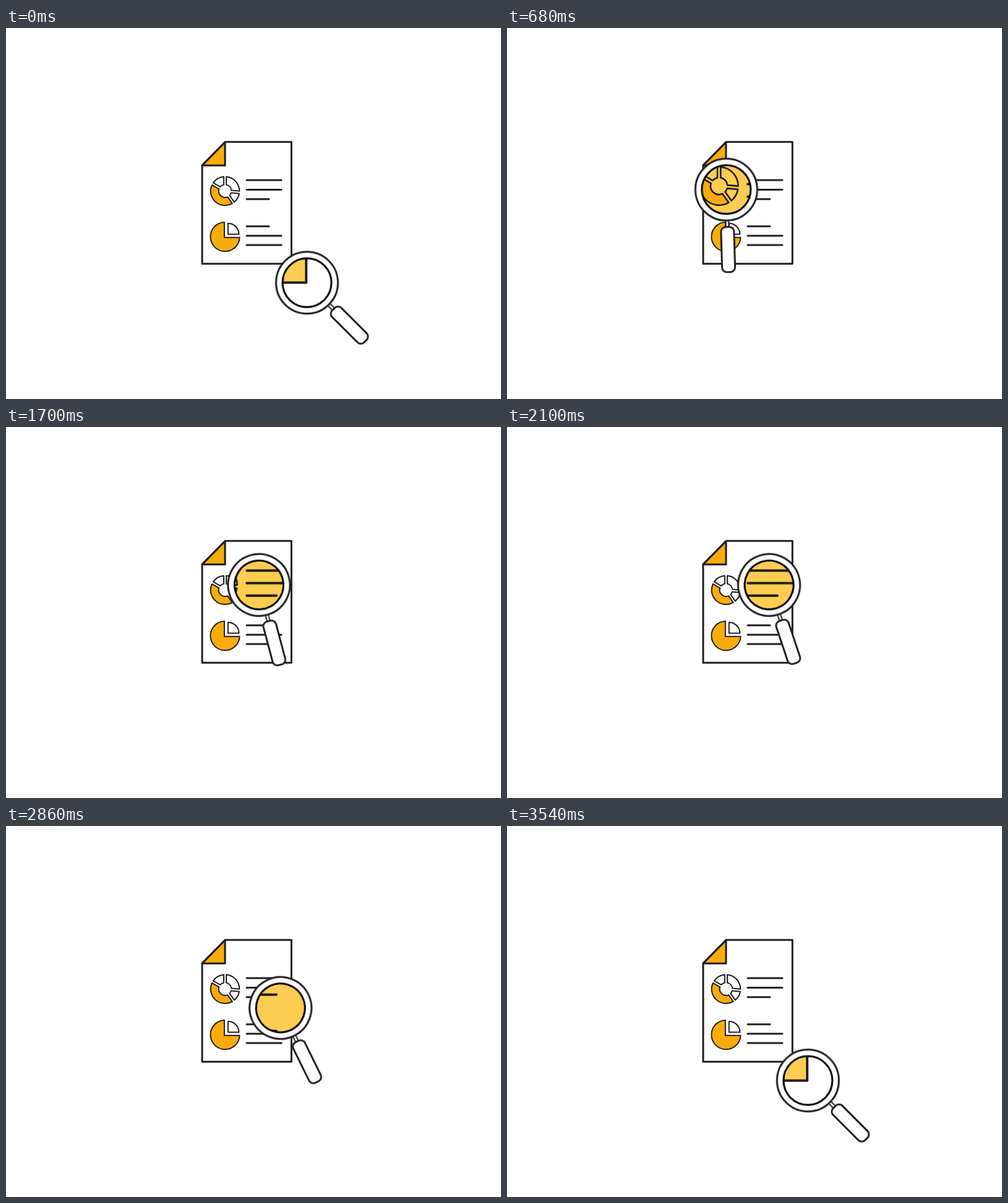
An HTML page for the animation above (3730 ms loop, 800 by 600 pixels).

```html
<!DOCTYPE html>
<html lang="en">
<head>
<meta charset="utf-8">
<title>Report review</title>
<style>
  html, body { margin: 0; width: 100%; height: 100%; overflow: hidden; background: #fff; }
  svg { position: absolute; left: 0; top: 0; width: 800px; height: 600px; }
  svg * { stroke-linejoin: round; stroke-linecap: round; }

  .page  { --paper: #fff; --accent: #f8ac0c; }
  .zoom  { --paper: #fccd50; --accent: #f7a90f; }
  .paper { fill: var(--paper); }
  .accent { fill: var(--accent); }
  .ink  { stroke: #231f20; stroke-width: 3; }
  .thin { stroke: #231f20; stroke-width: 2; }

  /* Travel in, sweep right, travel back, short rest */
  .tool, .zoom { animation: 3730ms ease infinite; }
  .tool { animation-name: move; }
  .zoom { animation-name: clip; }
  @keyframes move {
    0%, 96.515%, 100% { transform: translate(486.5px, 412px) rotate(-45deg); }
    24.129% { transform: translate(349.3px, 255.5px) rotate(0deg); }
    72.386% { transform: translate(429.6px, 255.5px) rotate(-20deg); }
  }
  @keyframes clip {
    0%, 96.515%, 100% { clip-path: circle(39.5px at 486.5px 412px); }
    24.129% { clip-path: circle(39.5px at 349.3px 255.5px); }
    72.386% { clip-path: circle(39.5px at 429.6px 255.5px); }
  }
</style>
</head>
<body>
<svg class="page" viewBox="0 0 800 600">
  <defs>
    <g id="doc">
      <path class="paper ink" d="M354 184.2H461.3V381.3H317V222Z"/>
      <path class="accent ink" d="M354 184.7V222.2H317Z"/>
      <g id="donut"></g>
      <path class="accent thin" d="M352.9 314.1V338.7H377.6A23.6 23.6 0 1 1 352.9 314.1Z"/>
      <path class="paper thin" d="M358.8 316V333.4H376.4A17.5 17.5 0 0 0 358.8 316Z"/>
      <path class="ink" d="M389 246.1h56M389 261.4h56M389 276.7h36M389 320.8h36M389 335.9h56M389 351h56"/>
    </g>
  </defs>
  <use href="#doc"/>
  <g class="tool" fill="#fff">
    <path class="thin" d="M-2.4 50V61M2.4 50V61"/>
    <rect class="ink" x="-10.5" y="60.5" width="21" height="73" rx="7.5"/>
    <circle class="ink" r="50"/>
  </g>
</svg>
<svg class="zoom" viewBox="0 0 800 600">
  <use href="#doc" transform="translate(388.5 288.5) scale(1.328) translate(-388.5 -288.5)"/>
</svg>
<svg viewBox="0 0 800 600">
  <g class="tool"><circle r="39.5" fill="none" stroke="#000" stroke-width="3"/></g>
</svg>
<script>
  const cx = 354, cy = 263.7, outer = 23.3, inner = 10.3, halfGap = 2;

  // Point on a segment edge, kept parallel to the gap; degrees run clockwise from the top
  function edge(r, deg, side) {
    const a = deg * Math.PI / 180 + side * Math.asin(halfGap / r);
    return `${(cx + r * Math.sin(a)).toFixed(2)} ${(cy - r * Math.cos(a)).toFixed(2)}`;
  }

  function segment(from, to, fill) {
    const big = to - from > 180 ? 1 : 0;
    const d = `M${edge(outer, from, 1)}A${outer} ${outer} 0 ${big} 1 ${edge(outer, to, -1)}` +
      `L${edge(inner, to, -1)}A${inner} ${inner} 0 0 0 ${edge(inner, from, 1)}Z`;
    return `<path class="${fill} thin" d="${d}"/>`;
  }

  document.getElementById('donut').innerHTML =
    segment(0, 95, 'paper') + segment(95, 145, 'paper') +
    segment(145, 300, 'accent') + segment(300, 360, 'paper');
</script>
</body>
</html>
```
